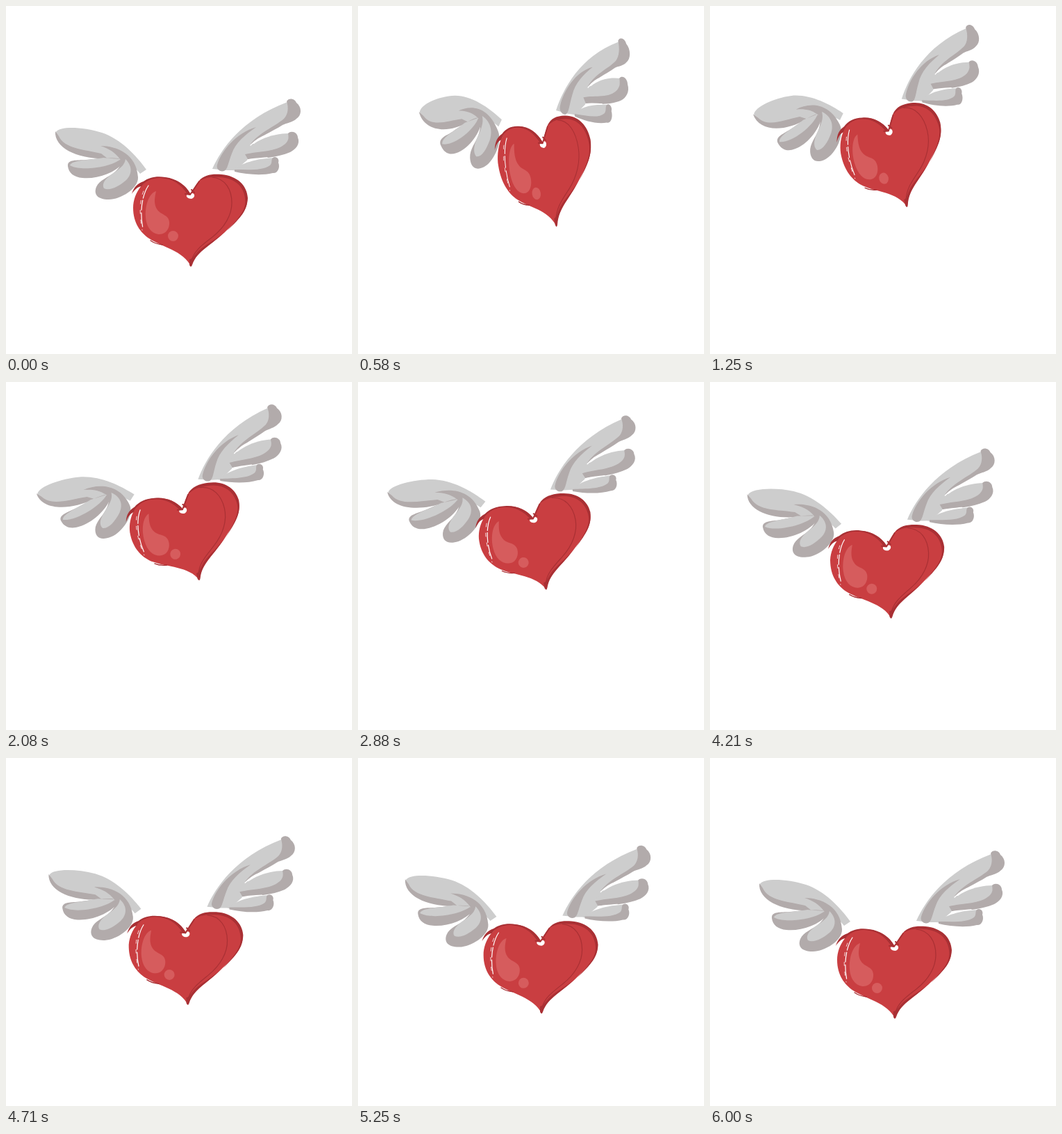
Recreate the animation shown at these times as an HTML page. Size 498 by 500 pixels, loop 6.04 s.

```html
<!DOCTYPE html>
<html lang="en">
<head>
<meta charset="utf-8">
<title>Winged heart</title>
<style>
html, body { margin: 0; width: 100%; height: 100%; overflow: hidden; background: #fff; }
svg { display: block; width: 100vw; height: 100vh; }
.light { fill: #cdcdcd; }
.dark { fill: #b2abab; }
.red { fill: #c93e41; }
.deep { fill: #a93034; }
.glow { fill: #d65c5d; }
.line { fill: none; stroke: #a93034; stroke-linecap: round; stroke-linejoin: round; }
.gap { fill: none; stroke: #fff; stroke-linecap: round; }
</style>
</head>
<body>
<svg viewBox="0 0 498 500">
  <g id="all">
    <g id="left">
      <path class="light" d="M72 181C78 172 112 174 138 182C165 191 187 214 202 235L193 241C186 232 178 226 170 221L142 218C110 216 76 206 72 181Z"/>
      <path class="dark" d="M71 180C69 205 106 221 146 219L137 212C112 206 84 205 76 187Z"/>
      <path class="dark" d="M89 230C88 220 102 222 115 221C130 220 145 217 162 219L170 225C155 241 130 249 110 247C98 246 90 240 89 230Z"/>
      <path class="light" d="M92 229C95 221 118 222 140 218L165 220C150 232 108 238 92 229Z"/>
      <path class="dark" d="M136 201C160 201 188 213 190 246C191 262 165 278 148 278C131 278 126 270 130 260C134 250 148 246 156 239C163 233 168 226 164 220C157 210 148 205 136 201Z"/>
      <path class="light" d="M141 262C136 252 150 243 159 237C167 231 171 227 172 220C184 232 180 244 172 251C161 260 149 266 141 262Z"/>
    </g>
    <g id="right">
      <path class="light" d="M297 234C309 207 338 163 405 138L413 158C392 173 366 184 354 198L380 198L350 219L330 236L317 236Z"/>
      <path class="dark" d="M404 137C407 131 416 133 418 139C426 145 426 157 418 162C413 167 404 168 398 171C382 181 364 188 351 200C363 182 386 174 400 162C406 156 407 146 404 137Z"/>
      <path class="dark" d="M360 174C344 185 330 197 325 212C320 224 319 235 314 237C308 239 302 234 304 228C310 208 332 182 360 174Z"/>
      <path class="light" d="M344 211C354 195 380 183 408 183L404 206L351 219Z"/>
      <path class="dark" d="M406 183C411 178 420 182 420 189C424 198 417 206 409 210C390 218 368 219 348 220L344 213C366 208 388 210 402 198C407 193 407 189 406 183Z"/>
      <path class="light" d="M326 236C338 226 360 219 388 218L386 238L350 240Z"/>
      <path class="dark" d="M384 218C389 215 394 220 392 225C395 232 391 241 384 240C368 244 346 242 329 238V235C348 235 369 237 380 229C384 225 381 221 384 218Z"/>
      <path class="gap" stroke-width="1.4" d="M352 200C360 192 367 188 374 186M348 221C356 219 364 219 376 218"/>
    </g>
    <path class="red" d="M265 270C257 253 238 245 218 246C200 246 183 268 183 290C183 312 194 326 206 334C224 346 256 352 266 374C273 353 298 342 318 322C338 304 349 292 347 274C345 254 328 243 304 243C292 243 283 246 279 250C274 256 270 261 267 270Z"/>
    <path class="deep" d="M181 270C184 260 189 255 198 252C206 246 217 244 229 246C246 248 259 258 265 269L262 272C252 255 239 248 222 247C209 247 200 252 195 259C189 260 185 264 181 270Z"/>
    <path class="deep" d="M278 251C286 242 297 241 310 242C333 244 347 258 348 276C347 294 338 304 318 323C340 300 346 290 344 276C342 259 329 247 308 246C296 245 288 246 281 250Z"/>
    <path class="deep" d="M264 364C268 364 271 358 278 351C288 342 302 336 314 325C296 344 276 350 268 372Q266 377 264 372Z"/>
    <path class="line" stroke-width="1.2" d="M297 246C316 248 325 264 325 283C325 300 315 318 297 332C283 343 270 352 267 366"/>
    <path fill="#fff" d="M260 274Q259 269 264 271Q269 267 271 271Q272 275 267 277Q262 277 260 274Z"/>
    <path class="line" stroke-width="2" d="M258 270L265 271L257 261M265 271L278 252M267 264L271 268"/>
    <path class="gap" stroke-width="1.2" stroke-dasharray="20 3 14 4" d="M205 258C196 271 192 296 197 319"/>
    <path class="gap" stroke-width=".8" stroke-dasharray="5 9" d="M198 266C192 280 192 300 196 322"/>
    <path class="line" stroke-width="1.3" d="M208 337Q215 342 225 343"/>
    <path class="glow" d="M216 266C206 269 200 286 201 303C202 319 211 328 221 328C231 328 236 318 235 310C234 300 223 300 218 293C212 285 214 275 216 266Z"/>
    <circle class="glow" cx="240.5" cy="330.5" r="7.5"/>
  </g>
</svg>
<script>
const LOOP = 6040;

// Sine ease from 0 to 1 between two times
function ease(t, from, to) {
  const u = Math.min(1, Math.max(0, (t - from) / (to - from)));
  return (1 - Math.cos(Math.PI * u)) / 2;
}

const place = (id, value) => document.getElementById(id).setAttribute("transform", value);

function draw(now) {
  const t = now % LOOP;

  // Crouch, leap up, then float back down
  const fall = ease(t, 1700, LOOP);
  const height = ease(t, 200, 754) - fall;
  const lean = height ** 1.5;
  const leap = ease(t, 250, 800);
  const crouch = ease(t, 0, 250) - leap;
  const stretch = leap * Math.exp(-Math.max(0, t - 800) / 370);

  const sy = 1 + 0.3 * stretch - 0.06 * crouch;
  const sx = sy ** -1.15;
  const x = 266 + 12.5 * lean + 17 * stretch - 9 * Math.sin(Math.PI * fall);
  const y = 374 - 92 * height + 21.6 * stretch;
  const droop = 9.5 * lean + 9 * stretch;

  place("all", `translate(${x} ${y}) rotate(${-13.3 * lean}) scale(${sx} ${sy}) translate(-266 -374)`);
  place("left", `rotate(${-droop} 200 237)`);
  place("right", `rotate(${droop} 297 234)`);
  requestAnimationFrame(draw);
}
draw(performance.now());
</script>
</body>
</html>
```
